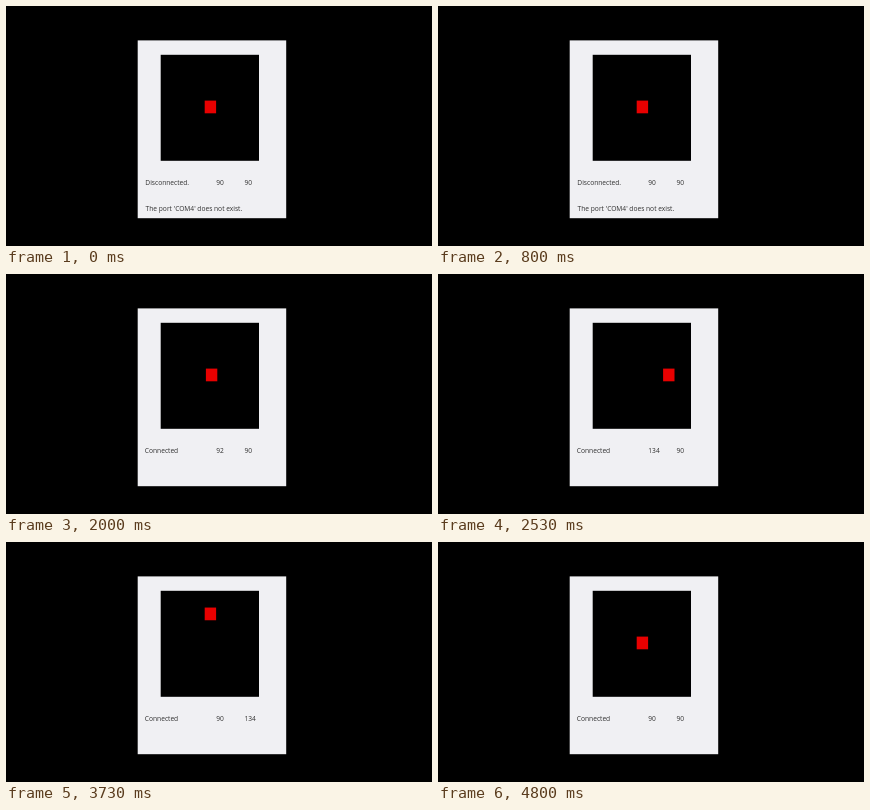
Animation, 426 px wide and 240 px high, one loop 4.87 s. Source, as an HTML page with a canvas:

```html
<!DOCTYPE html>
<html lang="en">
<head>
<meta charset="utf-8">
<title>Joystick monitor</title>
<style>
  html, body { margin: 0; width: 100%; height: 100%; overflow: hidden; background: #000; }
  canvas { display: block; width: 426px; height: 240px; }
</style>
</head>
<body>
<canvas id="stage" width="426" height="240"></canvas>
<script>
const ctx = document.getElementById("stage").getContext("2d");
const LOOP = 4870;
const STEP = 1000 / 15;
const CENTER = 90;

// Each key is [time in ms, angle in degrees].
const panKeys = [[1930, 90], [2000, 92], [2330, 134], [2530, 134], [2870, 90]];
const tiltKeys = [[3270, 90], [3600, 134], [3930, 134], [4330, 90]];

function angleAt(keys, time) {
  if (time <= keys[0][0]) return keys[0][1];
  for (let i = 1; i < keys.length; i++) {
    const [t0, a0] = keys[i - 1];
    const [t1, a1] = keys[i];
    if (time <= t1) {
      const p = (time - t0) / (t1 - t0);
      return Math.round(a0 + (a1 - a0) * p * p * (3 - 2 * p));
    }
  }
  return keys[keys.length - 1][1];
}

function box(x, y, w, h, color) {
  ctx.fillStyle = color;
  ctx.fillRect(x, y, w, h);
}

function label(text, x, y) {
  ctx.fillStyle = "#303030";
  ctx.fillText(text, x, y);
}

function draw(time) {
  const t = Math.floor((time + 5) / STEP) * STEP;
  const pan = angleAt(panKeys, t);
  const tilt = angleAt(tiltKeys, t);

  box(0, 0, 426, 240, "#000");
  box(131.7, 34.4, 148.5, 177.8, "#f0f0f3");
  box(154.7, 48.8, 98.3, 106, "#000");

  const x = 198.7 + (pan - CENTER) * 0.6;
  const y = 94.6 - (tilt - CENTER) * 0.66;
  box(x, y, 11.4, 12.7, "#e80000");

  ctx.font = "6.65px 'Open Sans', 'Noto Sans', sans-serif";
  if (t < 1190) label("Disconnected.", 139.3, 179.4);
  else label("Connected", 138.8, 179.4);
  label(pan, 210.3, 179.4);
  label(tilt, 238.5, 179.4);
  if (t < 1720) label("The port 'COM4' does not exist.", 139.6, 205.4);
}

const start = performance.now();
function tick() {
  draw((performance.now() - start) % LOOP);
  requestAnimationFrame(tick);
}
tick();
</script>
</body>
</html>
```
